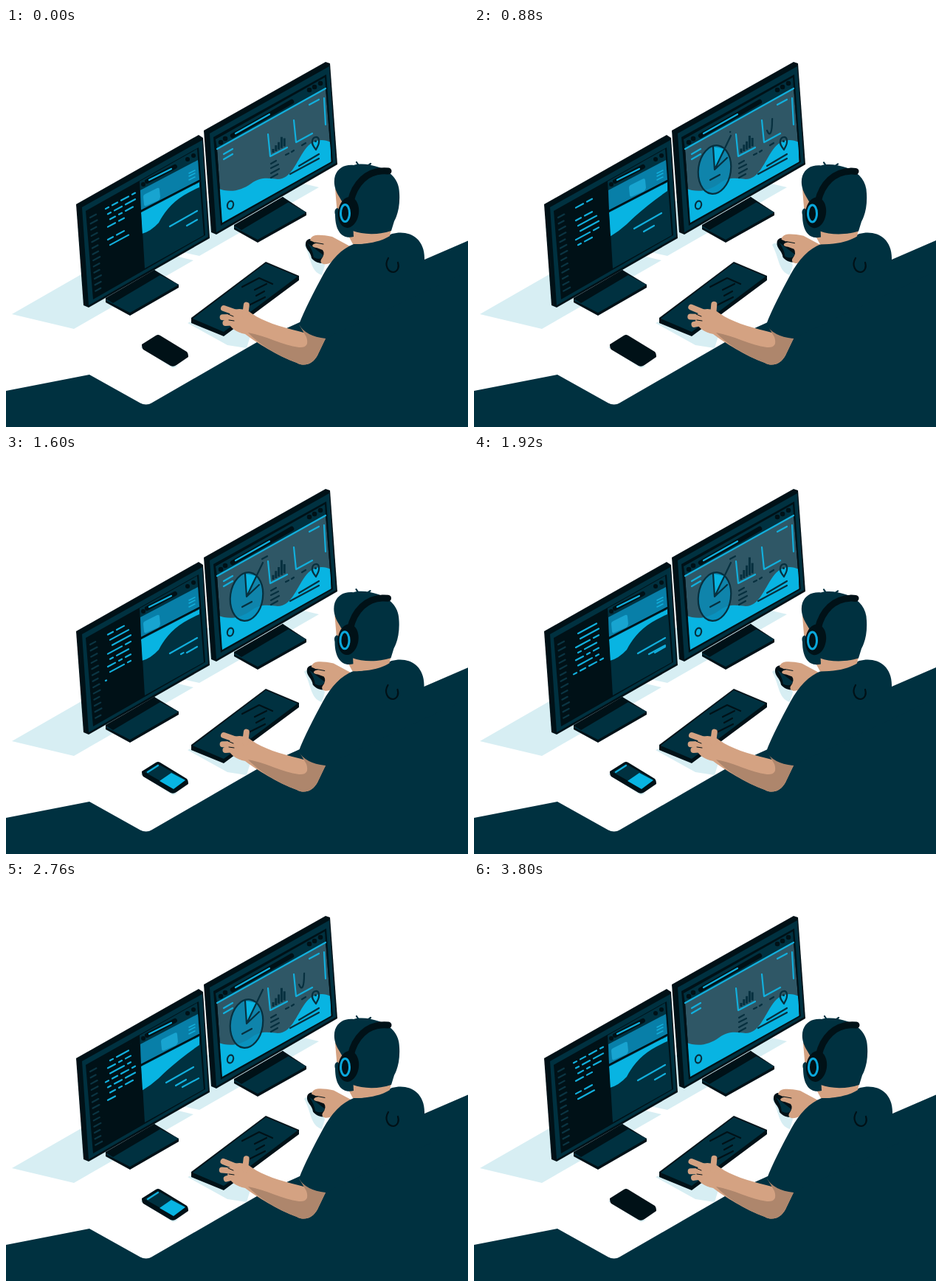
These frames come from a looping animation (626x541 px, 3840 ms). An HTML page:

```html
<!DOCTYPE html>
<html lang="en">
<head>
<meta charset="utf-8">
<title>Developer at a desk</title>
<style>
  html, body { margin: 0; width: 100%; height: 100%; overflow: hidden; background: #fff; }
  svg { display: block; width: 626px; height: 541px; }
  .navy { fill: #003140; } .black { fill: #001117; } .cyan { fill: #08b4e2; }
  .shade { fill: #d7eef3; } .skin { fill: #d4a282; } .slate { fill: #2f5766; }
  .line { fill: none; stroke-linecap: round; stroke-linejoin: round; stroke-width: 2.2; }
  .c { stroke: #12afdc; } .n { stroke: #07303f; } .k { stroke: #001117; } .s { stroke: #d4a282; }
</style>
</head>
<body>
<svg viewBox="0 0 626 541">
  <defs>
    <clipPath id="codeClip"><path d="M128 243 180 214 188 326 118 366Z"/></clipPath>
    <clipPath id="pageClip"><path d="M183 250 262 209 268 281 188 326Z"/></clipPath>
    <clipPath id="dashClip"><path d="M286 164 433 81 441 181 293 264Z"/></clipPath>
  </defs>

  <path class="shade" d="M8 388 170 295 254 315 92 408ZM178 290 340 196 424 216 262 309Z
    M246 400 300 430 326 434 335 405 270 390ZM182 433 226 461 232 459 190 430Z"/>
  <path class="navy" d="M0 492 113 470 181 508Q190 513 198 508L347 422 440 380 626 289V541H0Z"/>

  <!-- left monitor -->
  <path class="black" d="M135 366 201 328 234 348V352L168 390 135 372Z"/>
  <path class="navy" d="M135 369 201 331 234 348 168 386Z"/>
  <path class="black" d="M135 367 201 328 209 335 145 373Z"/>
  <path class="black" d="M95 239 261 145 267 149 276 285 112 379 105 376Z"/>
  <path class="navy" d="M103 243 266 152 274 283 112 376Z"/>
  <path class="black" d="M108 248 261 162 270 281 118 368Z"/>
  <path class="navy" d="M181 208 259 164 268 281 188 326Z"/>
  <path class="line k" d="M186 212h.1M191 208 229 188M246 178h.1M254 173h.1" style="stroke-width:6"/>
  <path class="line c" d="M194 206 224 191"/>
  <path fill="#087fa8" d="M182 220 260 179 262 206 183 247Z"/>
  <path class="line c" d="M248 197 256 193M248 201 256 197M248 206 256 202" style="stroke-width:1.5"/>
  <path id="card" fill="#18a4d0" d="M189 225 205 217Q208 216 208 219L209 229Q209 232 206 234L190 241Q187 242 187 239L186 229Q186 226 189 225Z"/>
  <g clip-path="url(#pageClip)">
    <path id="hill" class="cyan"/>
    <path id="captionA" class="line c" d="M222 269 259 248"/>
    <path id="captionB" class="line c" d="M245 268 259 260"/>
    <path id="captionC" class="line c"/>
  </g>
  <path class="line k" d="M183 248 262 207" style="stroke-width:2"/>
  <path id="gutter" class="line" stroke="#0b3543"/>
  <g clip-path="url(#codeClip)"><path id="code" class="line c"/></g>

  <!-- right monitor -->
  <path class="black" d="M309 267 375 229 407 250V254L341 291 309 273Z"/>
  <path class="navy" d="M309 270 375 232 407 250 341 287Z"/>
  <path class="black" d="M309 268 375 229 383 236 319 274Z"/>
  <path class="black" d="M268 139 433 46 439 48 449 185 285 280 278 277Z"/>
  <path class="navy" d="M276 143 438 52 447 183 285 277Z"/>
  <path class="black" d="M281 148 434 63 443 182 291 268Z"/>
  <path class="navy" d="M284 151 432 67 433 81 286 164Z"/>
  <path class="line k" d="M291 155h.1M297 150h.1M307 146 387 100M411 84h.1M418 80h.1M426 75h.1" style="stroke-width:6.5"/>
  <path class="line c" d="M311 143 357 117"/>
  <g clip-path="url(#dashClip)">
    <path class="slate" d="M286 164 433 81 441 181 293 264Z"/>
    <path class="cyan" d="M286 217C303 224 318 221 332 211C345 201 357 204 368 205C386 205 393 182 405 165C414 152 428 149 440 155V190L290 270Z"/>
  </g>
  <path class="line c" d="M286 164 433 82M295 171 307 164M295 178 307 171M411 104 424 97M431 95 433 131
    M355 144 358 174 381 162M390 125 393 155 415 143"/>
  <path class="line n" d="M359 184 366 180M359 190 369 185M359 197 370 191M359 203 368 198M379 172 383 170
    M387 168 390 166M401 159 406 156M385 198 424 177M397 187 424 171"/>
  <ellipse class="line n" cx="304" cy="240" rx="4" ry="5.5" transform="rotate(15 304 240)"/>
  <path class="line n" d="M420 165C416 160 414 157 415 153C416 147 423 146 424 152C425 157 422 161 420 165Z"/>
  <circle class="navy" cx="419.500" cy="153.500" r="1.500"/>
  <path id="bars" class="line n" style="stroke-width:3;stroke-linecap:butt"/>
  <path id="trend" class="line n" pathLength="100" d="M397 139Q400 146 402 142Q404 138 404 125Q405 114 408 122Q410 125 412 115"/>
  <g id="pie">
    <ellipse class="line n" rx="22" ry="33" transform="rotate(8)" style="fill:#0a8cb8;fill-opacity:.85"/>
    <path class="cyan" d="M0 0-2-31 13-28Z"/>
    <path class="line n" d="M-2-31 0 0 22-46M0 0 17-16M-6 14 7 7"/>
  </g>
  <path id="tag" class="line n"/>

  <!-- phone and keyboard -->
  <path class="black" d="M184 429 203 417Q206 415 209 417L245 439Q247 441 247 446L231 457Q227 460 223 458L186 436Q184 434 184 429Z"/>
  <g id="phone">
    <path class="navy" d="M188 430 206 419 243 440 227 452Z"/>
    <path class="cyan" d="M208 442 224 431 243 441 227 453Z"/>
    <path class="line c" d="M192 430 206 421"/>
  </g>
  <path class="black" d="M251 393 352 317 397 336V342L295 418 251 400Z"/>
  <path class="navy" d="M253 394 352 319 395 337 295 412Z"/>
  <path class="line k" d="M320 351 343 339 361 347M337 355 353 347M339 363 350 357M329 376 351 365"/>

  <!-- mouse hand -->
  <path class="shade" d="M404 294C411 286 424 300 432 322L428 335C412 330 414 312 404 294Z"/>
  <g id="mouse">
    <path class="black" d="M406 292C407 283 419 285 426 292L436 312C434 322 420 320 414 312C413 303 405 300 406 292Z"/>
    <path class="navy" d="M409 292 417 298 430 308Q427 316 417 311Q416 302 409 292Z"/>
    <path class="skin" d="M412 288C414 279 425 280 442 283L468 297 442 317C433 323 424 320 427 314Q433 306 429 301L421 298C412 297 415 292 421 292Z"/>
    <path class="line k" d="M419 291 430 293" style="stroke-width:1"/>
  </g>

  <!-- person -->
  <path class="skin" d="M305 383C316 379 326 381 333 387C348 398 372 405 396 411L433 421 422 444C416 455 405 460 394 454C367 444 340 427 324 415C312 413 303 406 300 397Z"/>
  <path fill="#ae866c" d="M328 413C352 417 374 430 397 433Q412 434 407 419L397 402 433 421 422 444C416 455 405 460 394 454C367 444 342 428 328 413Z"/>
  <g id="fingers" class="line s"></g>
  <g id="torso">
    <path class="navy" d="M397 402C404 383 418 356 430 334C441 314 455 299 471 293C491 293 505 288 523 279C545 273 568 284 567 314L627 288V330L433 421Q406 418 397 402Z"/>
    <path class="line k" d="M518 312C512 322 518 331 525 331C531 330 533 324 531 318"/>
  </g>
  <g id="head">
    <path class="skin" d="M446 218 449 254 470 293C492 293 509 289 520 282L523 268 470 220Z"/>
    <path class="navy" d="M446 253Q444 246 449 244L470 262 471 283C456 287 446 276 446 253Z"/>
    <path class="navy" d="M451 228C446 220 443 210 446 200C450 190 458 185 471 186C481 183 494 185 506 189C522 195 533 207 533 224C534 240 531 253 526 262L522 275C503 281 483 280 470 275L458 240Z"/>
    <path class="line" stroke="#003140" d="M479 188 475 182M490 187 494 184M523 208 529 211"/>
    <path class="line k" d="M467 235C472 213 488 191 518 194" style="stroke-width:9"/>
    <ellipse class="black" cx="464" cy="250" rx="14" ry="21" transform="rotate(8 464 250)"/>
    <ellipse class="line" cx="459.500" cy="251" rx="6" ry="11.500" stroke="#0aa8dc" style="stroke-width:3"/>
  </g>
</svg>
<script>
const LOOP = 3840, ROW_TIME = 320, ROW_STEP = 8.7, SLOPE = -0.54;
const el = id => document.getElementById(id);
const set = (id, name, value) => el(id).setAttribute(name, value);
const move = (id, x, y) => set(id, 'transform', `translate(${x} ${y})`);
const show = (id, on) => set(id, 'visibility', on ? 'visible' : 'hidden');
const mix = (a, b, u) => a + (b - a) * u;

// Eased value between [time, value] pairs
function keys(t, ...points) {
  let [t0, v0] = points[0];
  for (const [t1, v1] of points) {
    if (t < t1) {
      const u = Math.max(0, (t - t0) / (t1 - t0));
      return mix(v0, v1, u * u * (3 - 2 * u));
    }
    [t0, v0] = [t1, v1];
  }
  return v0;
}

const rows = ['   =========', ' ======= ===', '  == ======', ' ==== == ===', '  ======= ==', '== === ==== ==',
  ' == ==== =====', '  === == ====', ' ==== ===', '', ' === ====', '  ========='];

function codePath(t) {
  const n = t / ROW_TIME, row = Math.floor(n), part = n - row;
  const scroll = row - 1 + Math.min(1, part * 4);
  let d = '';
  for (let j = row - 7; j <= row; j++) {
    const text = rows[(j + rows.length) % rows.length];
    const typed = j === row ? text.slice(0, Math.ceil(part * text.length)) : text;
    const y = 298 - (scroll - j) * ROW_STEP;
    for (const run of typed.matchAll(/=+/g)) {
      const x = run.index * 3 + 1, w = run[0].length * 3 - 2;
      d += `M${134 + x} ${y + x * SLOPE}l${w} ${w * SLOPE}`;
    }
  }
  return d;
}

function gutterPath(t) {
  let d = '';
  for (let i = 0; i < 13; i++) {
    const w = 8 + Math.sin(i * 2 + t / LOOP * Math.PI * 4);
    d += `M${114 + i * 0.6} ${257 + i * 8.3}l${w} ${w * SLOPE}`;
  }
  return d;
}

function barsPath(t) {
  const grow = keys(t, [0, 0], [880, 0.2], [1280, 0.1], [1900, 1], [2760, 0.45], [3400, 0]);
  return [5, 8, 10, 15, 11].map((h, i) =>
    `M${362 + i * 3.8} ${169 - i * 2.1}v${-h - grow * [2, 3, 5, 9, 3][i]}`).join('');
}

const fingers = [[312, 386, 295, 380], [310, 392, 293, 391], [312, 399, 298, 401], [324, 390, 326, 376]];

function draw(t) {
  const c = t % 1920;
  const slide = keys(c, [300, 0], [700, 1], [1290, 1], [1470, 0]);
  move('card', 24 * slide, -12.5 * slide);
  set('hill', 'd', `M183 250 262 209V${mix(216, 221, slide)}
    C${mix(232, 240, slide)} ${mix(229, 236, slide)} ${mix(218, 222, slide)} ${mix(243, 251, slide)} ${mix(207, 207, slide)} ${mix(264, 266, slide)}
    Q196 276 184 ${mix(279, 283, slide)}Z`);
  move('captionA', -5 * slide, 3 * slide);
  move('captionB', -15 * slide, 8 * slide);
  move('captionC', 2 * slide, 8 * slide);
  const caption = keys(t, [1500, 0], [1900, 22], [2800, 22], [3300, 0]);
  set('captionC', 'd', caption > 0.5 ? `M237 270l${caption} ${caption * SLOPE}` : '');
  set('gutter', 'd', gutterPath(t));
  set('code', 'd', codePath(t));
  set('bars', 'd', barsPath(t));

  // The trend line draws on, then its tail catches up
  const head = keys(c, [560, 0], [860, 58], [1150, 100]);
  const tail = keys(c, [900, 0], [1280, 58], [1560, 100]);
  set('trend', 'stroke-dasharray', `0 ${tail} ${Math.max(0, head - tail)} 200`);
  show('trend', head - tail > 0.5);

  const pie = keys(t, [240, 0], [720, 1], [3200, 1], [3600, 0]);
  set('pie', 'transform', `translate(326 192) scale(${pie})`);
  show('pie', pie > 0.01);
  const tag = keys(t, [840, 0.1], [1200, 7], [2350, 7], [2700, 0]);
  set('tag', 'd', t > 840 && tag > 0.05 ? `M347 141l${tag} ${tag * SLOPE}` : '');
  show('phone', t >= 1560 && t < 3600);

  const mouse = keys(t, [0, 0], [880, 4.5], [1280, 1.5], [1920, 2], [2760, 2], [3360, 0]);
  move('mouse', mouse, -0.3 * mouse);
  const bob = keys(t, [200, 0], [880, 1], [1280, 0], [1920, 1], [2760, 0]);
  move('torso', -bob, 0);
  move('head', -bob, 0.4 * bob);

  el('fingers').innerHTML = fingers.map(([x1, y1, x2, y2], i) => {
    const tap = 1.4 * Math.sin(t / LOOP * Math.PI * 24 + i * 2);
    return `<path style="stroke-width:8" d="M${x1} ${y1}L${x2 + tap / 2} ${y2 + tap}"/>`;
  }).join('') + '<path class="k" style="stroke-width:1" d="M301 388 308 391M302 396 309 397"/>';
}

function tick() {
  draw(performance.now() % LOOP);
  requestAnimationFrame(tick);
}
tick();
</script>
</body>
</html>
```
